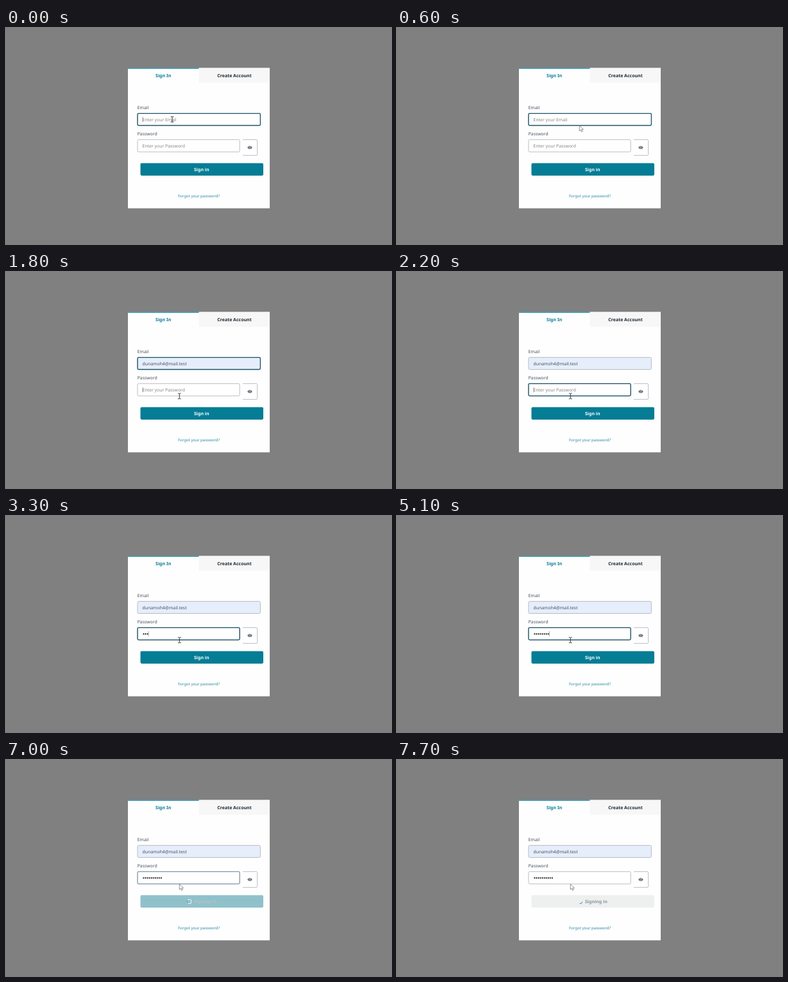
An HTML page that plays this animation: 600x338 px, repeating every 8 s.

```html
<!DOCTYPE html>
<html lang="en">
<head>
<meta charset="utf-8">
<title>Sign in form</title>
<style>
  html, body { margin: 0; height: 100%; overflow: hidden; background: #808080; }
  svg { display: block; width: 100vw; height: 100vh; }
  text { font: 6.85px "Noto Sans", "Open Sans", sans-serif; fill: #46525f; text-rendering: geometricPrecision; }
  .bold { font-size: 7px; font-weight: 700; }
  .mid { text-anchor: middle; }
  .hint { fill: #858585; }
  .box { stroke: #b1b6bd; stroke-width: .9; fill: #fff; }
  .focus { stroke: #1d5363; stroke-width: 1.3; fill: none; }
  .caret { stroke: #555; stroke-width: .5; }
</style>
</head>
<body>
<svg viewBox="0 0 600 338">
  <rect x="190" y="62.6" width="221" height="219.6" fill="#fefefe"/>
  <rect x="300.5" y="62.6" width="110.5" height="23" fill="#f7f7f7"/>
  <rect x="190" y="62.4" width="110.5" height="1.4" fill="#1787a0"/>
  <text class="bold mid" x="245.2" y="77" style="fill:#047d95">Sign In</text>
  <text class="bold mid" x="356" y="77" style="fill:#1c2834">Create Account</text>

  <text x="204.7" y="126.8">Email</text>
  <rect id="emailBox" class="box" x="205" y="133.6" width="191.4" height="18.9" rx="1.8"/>
  <rect id="emailFocus" class="focus" x="205" y="133.6" width="191.4" height="18.9" rx="1.8"/>
  <text id="email" x="212.6" y="145.5"></text>
  <path id="emailCaret" class="caret" d="M213 139v8.4"/>

  <text x="204.7" y="168.4">Password</text>
  <rect class="box" x="205" y="174.7" width="159.2" height="19.2" rx="1.8"/>
  <rect id="passFocus" class="focus" x="205" y="174.7" width="159.2" height="19.2" rx="1.8"/>
  <text id="passHint" class="hint" x="212.6" y="187.2">Enter your Password</text>
  <g id="dots" fill="#111"></g>
  <path id="passCaret" class="caret" d="M0 180.2v8.4"/>

  <path class="box" d="M369 174.7h21a1.7 1.7 0 0 1 1.7 1.7v21.2a1.7 1.7 0 0 1-1.7 1.7h-21"/>
  <path d="M376.2 187q3.8-5.2 7.6 0q-3.8 5.2-7.6 0z" fill="#46525f"/>
  <circle cx="380" cy="187" r="1.4" fill="#46525f" stroke="#fff" stroke-width=".6"/>

  <rect id="button" x="209.5" y="211.6" width="191.5" height="19.3" rx="1.8"/>
  <g id="spinner" fill="none" stroke-width="1.1">
    <circle cx="285.6" cy="221.4" r="3.2" stroke="#eff0f0"/>
    <circle id="arc" cx="285.6" cy="221.4" r="3.2" stroke="#2fa3b5" pathLength="100" stroke-dasharray="25 75"/>
  </g>
  <text id="label" class="bold" x="293" y="224.2"></text>
  <text class="mid" x="300.6" y="265.2" style="font-size:6.08px;fill:#2a8ca3">Forgot your password?</text>

  <path id="beam" fill="none" stroke="#222" stroke-width=".9" d="M-2.4-4.2h1.6l.8.5.8-.5h1.6M0-3.7v7.4M-2.4 4.2h1.6l.8-.5.8.5h1.6"/>
  <path id="arrow" fill="#fff" stroke="#666" stroke-width=".7" d="M0 0v8.6l2-1.9 1.4 3.1 1.5-.7-1.4-3h2.7z"/>
</svg>
<script>
const LOOP = 8000, STEP = 100;
const ADDRESS = "dunamoh4@mail.test";
// password focus, then one entry per typed character
const KEYS = [1900, 2800, 3100, 3300, 3500, 3700, 4100, 4800, 5100, 5600, 5900];
const PITCH = 3.05;
const START = [259, 143], LIST = [327.5, 169], PASS = [270.3, 194.2];

const $ = id => document.getElementById(id);
const show = (id, on) => $(id).style.display = on ? "" : "none";
const ramp = (t, from, length) => Math.min(1, Math.max(0, (t - from) / length));
const smooth = p => p * p * (3 - 2 * p);
const mix = (a, b, p) => a.map((v, i) => v + (b[i] - v) * p);
const rgb = c => `rgb(${c.map(Math.round)})`;

$("dots").innerHTML = KEYS.slice(1).map((_, i) =>
  `<circle cx="${214.4 + i * PITCH}" cy="184.6" r="1.1"/>`).join("");

function drawPointer(t) {
  const [x, y] = t < 1300
    ? mix(START, LIST, smooth(ramp(t, 250, 850)))
    : mix(LIST, PASS, smooth(ramp(t, 1250, 500)));
  const overText = y < 152.5 || (y > 174.5 && t < 6900);
  show("beam", overText);
  show("arrow", !overText);
  $(overText ? "beam" : "arrow").setAttribute("transform", `translate(${x} ${y})`);
  return y;
}

function drawEmail(t, pointerY) {
  const filled = t >= 1300, preview = !filled && pointerY > 154;
  const email = $("email");
  email.textContent = filled || preview ? ADDRESS : "Enter your Email";
  email.setAttribute("class", filled || preview ? "" : "hint");
  email.style.font = preview ? '6.2px "Liberation Sans", Arial, sans-serif' : "";
  $("emailBox").style.fill = filled || preview ? "#e6eefc" : "#fff";
  $("emailFocus").style.opacity = 1 - ramp(t, 1800, 300);
  show("emailCaret", t < 1300 && t % 1000 < 500);
}

function drawPassword(t) {
  const typed = Math.max(0, KEYS.filter(k => k <= t).length - 1);
  [...$("dots").children].forEach((dot, i) => dot.style.display = i < typed ? "" : "none");
  show("passHint", !typed);
  show("passCaret", t >= 1800 && t < 6900 && (t - KEYS[typed]) % 1000 < 500);
  $("passCaret").setAttribute("transform", `translate(${213 + typed * PITCH})`);
  $("passFocus").style.opacity = ramp(t, 1800, 400) * (1 - ramp(t, 6850, 250));
}

function drawButton(t) {
  const busy = t >= 6900, p = ramp(t, 6850, 250);
  $("button").style.fill = rgb(mix([4, 125, 149], [238, 239, 239], p));
  $("label").style.fill = rgb(mix([255, 255, 255], [137, 148, 159], p));
  $("label").textContent = busy ? "Signing in" : "Sign in";
  show("spinner", busy);
  const turn = 15 + (Math.min(t, 7700) - 7700) * 0.36;
  $("arc").setAttribute("transform", `rotate(${turn} 285.6 221.4)`);
}

function frame() {
  const t = Math.floor(performance.now() % LOOP / STEP) * STEP;
  drawEmail(t, drawPointer(t));
  drawPassword(t);
  drawButton(t);
  requestAnimationFrame(frame);
}
frame();
</script>
</body>
</html>
```
